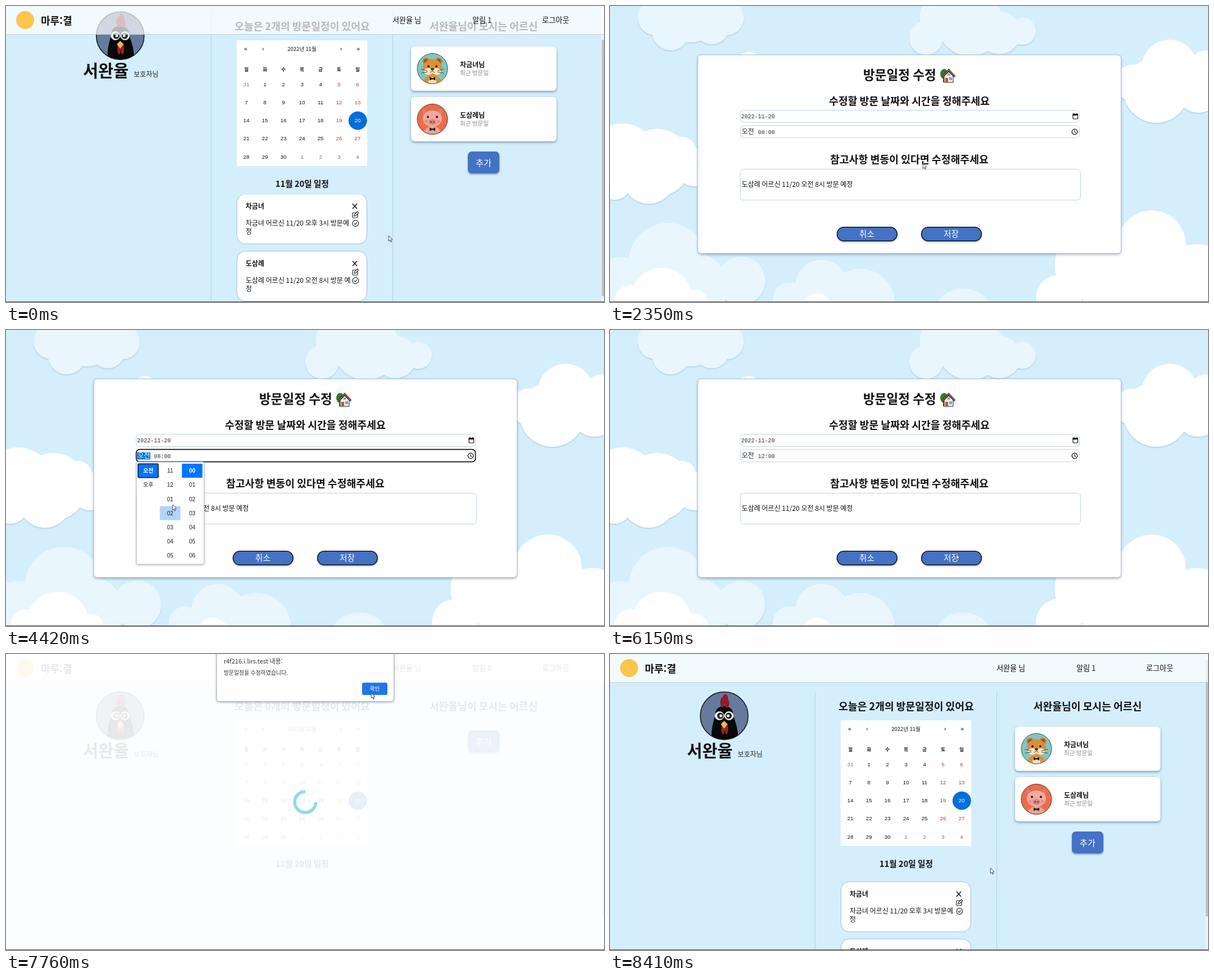
An HTML page with a canvas for the animation above (8480 ms loop, 1063 by 527 pixels).

```html
<!DOCTYPE html>
<html lang="ko">
<head>
<meta charset="utf-8">
<style>
  html, body { margin: 0; width: 100%; height: 100%; overflow: hidden; background: #d4eefc; }
  canvas { display: block; }
</style>
</head>
<body>
<canvas id="stage" width="1063" height="527"></canvas>
<script>
const ctx = document.getElementById('stage').getContext('2d');
const W = 1063, H = 527, LOOP = 8480;
const KR = '"Noto Sans CJK KR", "Noto Sans CJK", sans-serif';
const ARIAL = '"Liberation Sans", "Noto Sans CJK KR", sans-serif';
const MONO = '"Liberation Mono", monospace';
const SKY = '#d4eefc', BLUE = '#4472c4', PICK = '#0075ff';
const USER = '서완율', ELDER_A = '차금녀', ELDER_B = '도삼례';

// Key times of the story
const T = { edit: 1680, open: 3020, scroll: 4020, pick: 4890, close: 5400,
            alert: 6480, load: 7360, data: 7825, ready: 8060 };

// Pointer path: time, x, y
const PATH = [
  [0, 680, 409], [70, 680, 411], [335, 680, 411], [990, 616, 470], [1135, 616, 470],
  [1480, 617, 474], [1620, 617, 474], [2350, 556, 280], [2480, 802, 237], [2810, 825, 224],
  [2955, 825, 224], [3840, 294, 325], [4020, 294, 325], [4420, 296, 311], [4820, 293, 271],
  [4890, 293, 271], [5680, 673, 366], [5755, 673, 366], [6150, 615, 399], [6280, 615, 400],
  [6480, 615, 400], [7300, 660, 65], [7400, 660, 65], [7760, 649, 69], [7890, 640, 114],
  [8150, 620, 285], [8410, 676, 381], [8480, 676, 381]
];

function rate(i, a) {
  const p = PATH[i], q = PATH[i + 1];
  return p && q ? (q[a] - p[a]) / (q[0] - p[0]) : 0;
}
function slope(i, a) {
  const l = rate(i - 1, a), r = rate(i, a);
  return l * r > 0 ? 2 * l * r / (l + r) : 0;
}
function pointer(t) {
  let i = 0;
  while (i < PATH.length - 2 && t >= PATH[i + 1][0]) i++;
  const p = PATH[i], q = PATH[i + 1], d = q[0] - p[0], u = (t - p[0]) / d;
  return [1, 2].map(a => {
    const s = u * u * (3 - 2 * u);
    return p[a] + (q[a] - p[a]) * s + d * u * (1 - u) * ((1 - u) * slope(i, a) - u * slope(i + 1, a));
  });
}
const ease = u => { u = Math.min(1, Math.max(0, u)); return u * u * (3 - 2 * u); };

// Drawing helpers
function text(s, x, cy, size, o = {}) {
  ctx.font = `${o.w || 400} ${size}px ${o.font || KR}`;
  ctx.textAlign = o.align || 'left';
  ctx.fillStyle = o.c || '#111';
  ctx.fillText(s, x, cy + size * 0.37);
}
function finish(fill, stroke, lw = 1) {
  if (fill) { ctx.fillStyle = fill; ctx.fill(); }
  if (stroke) { ctx.shadowColor = 'transparent'; ctx.strokeStyle = stroke; ctx.lineWidth = lw; ctx.stroke(); }
}
function rect(x, y, w, h, fill) { ctx.fillStyle = fill; ctx.fillRect(x, y, w, h); }
function box(x, y, w, h, r, fill, stroke, lw) {
  ctx.beginPath(); ctx.roundRect(x, y, w, h, r); finish(fill, stroke, lw);
}
function oval(x, y, rx, ry, fill, stroke, lw) {
  ctx.beginPath(); ctx.ellipse(x, y, rx, ry, 0, 0, 7); finish(fill, stroke, lw);
}
const disc = (x, y, r, fill, stroke, lw) => oval(x, y, r, r, fill, stroke, lw);
function poly(pts, fill, stroke, lw, open) {
  ctx.beginPath();
  for (let i = 0; i < pts.length; i += 2) ctx.lineTo(pts[i], pts[i + 1]);
  if (!open) ctx.closePath();
  finish(fill, stroke, lw);
}
const line = (pts, c, lw = 1) => poly(pts, null, c, lw, true);
function shadow(dy, blur, alpha, draw) {
  ctx.save();
  ctx.shadowColor = `rgba(30,50,80,${alpha})`; ctx.shadowBlur = blur; ctx.shadowOffsetY = dy;
  draw();
  ctx.restore();
}
function at(x, y, draw) { ctx.save(); ctx.translate(x, y); draw(); ctx.restore(); }

// Portraits
function rooster() {
  disc(0, 0, 42.5, '#667a9d');
  ctx.save();
  ctx.beginPath(); ctx.arc(0, 0, 42, 0, 7); ctx.clip();
  ctx.beginPath(); ctx.moveTo(-22, 44);
  ctx.bezierCurveTo(-24, 20, -18, 10, -16, -4);
  ctx.bezierCurveTo(-14, -22, 14, -22, 16, -4);
  ctx.bezierCurveTo(18, 10, 26, 20, 24, 44); finish('#080808');
  oval(-3, -24, 4, 9, '#8f1d25'); oval(2, -30, 5, 9, '#8f1d25'); oval(5, -22, 4, 8, '#8f1d25');
  oval(-2, 23, 3, 10, '#9b2228'); oval(4, 23, 3, 10, '#9b2228');
  ctx.restore();
  oval(-8.5, 0, 8, 7.5, '#f4f4f4', '#d0d0d0', 1); oval(8.5, 0, 8, 7.5, '#f4f4f4', '#d0d0d0', 1);
  disc(-7, 0, 5.5, '#202020'); disc(8, 0, 5.5, '#202020');
  disc(-6, 0, 2.5, '#eee'); disc(7, 0, 2.5, '#eee');
  poly([0, 9, 6, 15, 0, 23, -6, 15], '#e7bb55');
  disc(0, 0, 42.5, null, '#111', 1.5);
}
function bow() { poly([-5, 15, 0, 17, 5, 15, 5, 21, 0, 19, -5, 21], '#222'); }
function hamster() {
  disc(0, 0, 27, '#83c5be');
  ctx.save(); ctx.beginPath(); ctx.arc(0, 0, 26.5, 0, 7); ctx.clip();
  oval(0, 24, 16, 12, '#dc8f39'); oval(0, 24, 7, 9, '#f6dfb9');
  ctx.restore();
  for (const s of [-1, 1]) { disc(s * 11, -13, 6.5, '#c97b2c'); disc(s * 11, -13, 3.8, '#85532b'); }
  oval(0, -2, 17, 15, '#dc8f39');
  for (const s of [-1, 1]) {
    oval(s * 7, 5, 8, 6, '#f7e5c6'); disc(s * 7, -4, 2, '#1b1b1b');
    line([s * 9, 4, s * 20, 1], '#222', 0.8); line([s * 9, 6, s * 20, 8], '#222', 0.8);
  }
  oval(0, 1, 3, 2, '#49301f'); line([-4, 7, 0, 4, 4, 7], '#49301f', 1);
  bow(); disc(0, 0, 27, null, '#31504f', 1);
}
function pig() {
  disc(0, 0, 27, '#e96d4a');
  ctx.save(); ctx.beginPath(); ctx.arc(0, 0, 26.5, 0, 7); ctx.clip();
  oval(0, 24, 15, 11, '#eda197');
  ctx.restore();
  for (const s of [-1, 1]) poly([s * 5, -12, s * 17, -18, s * 16, -5], '#d98279');
  oval(0, -1, 17, 14.5, '#f1a99f');
  for (const s of [-1, 1]) { disc(s * 8, -4, 2, '#241c1c'); disc(s * 11, 4, 3, '#e98d86'); }
  oval(0, 5, 7, 5, '#d9837c'); disc(-2.5, 5, 1.4, '#75383a'); disc(2.5, 5, 1.4, '#75383a');
  bow(); disc(0, 0, 27, null, '#5b3127', 1);
}

// Home page
function calendar() {
  rect(410, 118, 232, 224, '#fff');
  const mid = { align: 'center', font: ARIAL };
  [['«', 426], ['‹', 457], ['›', 595.5], ['»', 626]].forEach(([s, x]) => text(s, x, 133, 11, mid));
  text('2022년 11월', 526, 133.5, 9.6, { align: 'center' });
  const col = i => 427.3 + 32.95 * i;
  [...'월화수목금토일'].forEach((s, i) => text(s, col(i), 169.5, 8.3, { align: 'center', w: 700 }));
  for (let i = 0; i < 35; i++) {
    const c = i % 7, x = col(c), y = 196.5 + 32.1 * Math.floor(i / 7);
    const out = i < 1 || i > 30, today = i === 20;
    const n = i < 1 ? 31 : i > 30 ? i - 30 : i;
    if (i === 20) disc(625.3, 261.2, 16.4, '#006edc');
    const color = today ? '#fff' : out ? '#757575' : c > 4 ? '#bf3a28' : '#111';
    text(String(n), x, y, 9.8, { ...mid, c: color });
  }
}
function visit(y, name, a, b) {
  box(410.5, y + 0.5, 231, 89, 15, '#fff', '#a7bce2', 1);
  text(name, 426, y + 22.5, 12, { w: 700 });
  text(a, 426, y + 52.5, 12); text(b, 426, y + 67.5, 12);
  line([616, y + 18, 624, y + 27], '#111', 1.5); line([624, y + 18, 616, y + 27], '#111', 1.5);
  box(616, y + 34, 9, 9, 1.5, null, '#222', 1.2);
  poly([619, y + 40, 619.5, y + 37, 624.5, y + 32, 626.7, y + 34.2, 621.7, y + 39.2], '#fff', '#222', 1.1);
  disc(621.3, y + 53, 5.4, null, '#222', 1.2);
  line([618.7, y + 53, 620.7, y + 55, 624, y + 51.3], '#222', 1.2);
}
function elder(y, name, face) {
  shadow(2, 4, 0.45, () => box(720, y, 258.5, 79, 6, '#fff'));
  at(758, y + 39.5, face);
  text(name + '님', 807, y + 33, 12, { w: 700 });
  text('최근 방문일', 807, y + 47, 10.6, { c: '#8b8b8b' });
}
function header(alarms) {
  rect(0, 0, W, 50, 'rgba(255,255,255,0.7)');
  rect(0, 50, W, 1, '#b9d0de');
  disc(34, 25, 16, '#fcc54c');
  text('마루:결', 62, 26, 18, { w: 700 });
  const o = { w: 500 };
  text(USER + ' 님', 687, 25, 13.1, o);
  text('알림 ' + alarms, 829, 25, 13.1, o);
  text('로그아웃', 953, 25, 13.1, o);
}
function scrollbar(y, thumb) {
  rect(1058.5, 0, 5, H, '#f1f1f1');
  rect(1059, 11 + y * 0.867, 4, 456, thumb);
}
function home(y, inner, full, named) {
  rect(0, 0, W, H, SKY);
  ctx.save();
  ctx.translate(0, -y);
  rect(364, 67, 1, 520, '#b4d0e8'); rect(687, 67, 1, 520, '#b4d0e8');
  at(203, 110, rooster);
  text(USER, 137, 172.5, 29.3, { w: 700 });
  text('보호자님', 227, 179, 12, { c: '#222' });
  text(`오늘은 ${full ? 2 : 0}개의 방문일정이 있어요`, 526.5, 93, 18.2, { w: 700, align: 'center' });
  calendar();
  text('11월 20일 일정', 526.5, 374, 14.6, { w: 700, align: 'center' });
  text(USER + '님이 모시는 어르신', 849, 93, 18.2, { w: 700, align: 'center' });
  if (full) {
    ctx.save();
    ctx.beginPath(); ctx.rect(405, 393, 242, 200); ctx.clip();
    visit(405 - inner, ELDER_A, ELDER_A + ' 어르신 11/20 오후 3시 방문예', '정');
    visit(507 - inner, ELDER_B, ELDER_B + ' 어르신 11/20 오전 8시 방문 예', '정');
    ctx.restore();
    elder(129, named ? ELDER_A : '', hamster);
    elder(219, named ? ELDER_B : '', named ? pig : hamster);
  }
  const by = full ? 316 : 136;
  shadow(2, 3, 0.4, () => box(821, by, 56, 39, 7, BLUE));
  text('추가', 849, by + 20, 15.2, { c: '#fff', w: 500, align: 'center' });
  ctx.restore();
  scrollbar(y, '#c1c1c1');
  header(full ? 1 : 0);
}
function loading(t) {
  rect(0, 0, W, H, 'rgba(255,255,255,0.9)');
  if (t >= T.data) scrollbar(0, '#bcbcbc');
  const a = Math.max(0, t - 7765) * Math.PI * 2 / 1000;
  ctx.beginPath(); ctx.arc(532, 263.5, 18.7, a, a + Math.PI * 1.5);
  finish(null, '#8fdbe6', 5.6);
}

// Edit page
function cloud(fill, list) {
  shadow(2, 2, 0.13, () => {
    ctx.beginPath();
    for (const [x, y, r] of list) { ctx.moveTo(x + r, y); ctx.arc(x, y, r, 0, 7); }
    finish(fill);
  });
}
function sky() {
  rect(0, 0, W, H, SKY);
  const pale = '#e9f6fd', white = '#fff';
  cloud(pale, [[81, 20, 32], [108, 46, 33], [145, 20, 45], [181, 37, 31], [207, 21, 31]]);
  cloud(pale, [[562, 57, 30], [590, 20, 40], [640, 30, 59], [692, 48, 38], [733, 45, 24]]);
  cloud(pale, [[103, 456, 70], [233, 489, 43], [20, 505, 58], [150, 500, 60]]);
  cloud(pale, [[376, 499, 47], [445, 530, 62], [319, 522, 30], [628, 560, 57]]);
  cloud(white, [[22, 271, 62], [84, 279, 60], [128, 258, 25], [69, 305, 47], [8, 315, 30], [150, 287, 34]]);
  cloud(white, [[92, 521, 55], [37, 527, 30], [150, 530, 25]]);
  cloud(white, [[368, 540, 28]]);
  cloud(white, [[247, 106, 24]]);
  cloud(white, [[995, 110, 50], [930, 137, 33], [971, 150, 58], [1046, 148, 42], [1058, 106, 27]]);
  cloud(white, [[963, 425, 61], [850, 462, 60], [798, 520, 41], [1043, 483, 59], [930, 520, 90]]);
}
function house() {
  oval(-6, -3, 7, 9, '#2f7d32'); rect(-8, 4, 3, 8, '#754727');
  poly([-6, 1, 2, -7, 10, 1, 10, 12, -6, 12], '#f5efe3', '#222', 1);
  line([-9, 2, 2, -10, 13, 2], '#2a211c', 3.4); line([-9, 2, 2, -10, 13, 2], '#b86d43', 1.6);
  rect(-4, 4, 5, 8, '#c94f38'); rect(3, 3, 5, 5, '#4fb4e6'); rect(0, -4, 4, 4, '#4fb4e6');
}
function button(x, label) {
  shadow(2, 3, 0.45, () => box(x + 0.7, 393.7, 106.6, 24.6, 12, BLUE, '#10151f', 1.5));
  text(label, x + 53.5, 406, 14.7, { c: '#fff', align: 'center' });
}
function picker(t) {
  shadow(1, 4, 0.4, () => box(232, 235, 120, 182, 1, '#fff', '#bbb', 1));
  const row = 25.2, cy = i => 250.5 + row * i;
  const cell = (x, i, fill) => box(x, cy(i) - 12.6, 36.5, 25, 1, fill);
  const put = (s, x, i, on, font) =>
    text(s, x, cy(i), 10, { align: 'center', font, w: on ? 700 : 400, c: on ? '#fff' : '#222' });
  ctx.save();
  ctx.beginPath(); ctx.rect(232, 236, 120, 180); ctx.clip();
  cell(234.5, 0, PICK);
  box(234.7, 238.2, 36, 24.6, 2, null, '#111', 1.5);
  put('오전', 253, 0, true); put('오후', 253, 1);
  const picked = t >= T.pick ? 4 : 0;
  const off = 3 * ease((t - T.scroll) / 270) + ease((t - T.pick) / 150);
  const [hx, hy] = pointer(t - 100);
  const over = hx > 273 && hx < 311 && hy > 238 && hy < 414 ? Math.floor((hy - 238) / row + off) : -1;
  for (let i = Math.floor(off); i < off + 7; i++) {
    if (i === picked) cell(273.5, i - off, PICK);
    else if (i === over) cell(273.5, i - off, '#b1d4fc');
    put(String((7 + i) % 12 + 1).padStart(2, '0'), 291.8, i - off, i === picked, ARIAL);
  }
  cell(312.7, 0, PICK);
  for (let i = 0; i < 7; i++) put('0' + i, 331, i, !i, ARIAL);
  ctx.restore();
}
function edit(t) {
  sky();
  shadow(2, 4, 0.4, () => box(156, 87, 752.5, 353.5, 6, '#fff', '#a5bfe0', 1));
  text('방문일정 수정', 450, 122.5, 22.6, { w: 700 });
  at(600, 124, house);
  const head = { w: 700, align: 'center' };
  text('수정할 방문 날짜와 시간을 정해주세요', 532, 169, 18.3, head);
  text('참고사항 변동이 있다면 수정해주세요', 532, 273.5, 18.3, head);
  const open = t >= T.open && t < T.close, edge = '#c0d2ea';
  box(231.5, 185.5, 603, 22, 6, '#fff', edge, 1);
  box(231.5, 212.7, 603, 22, 6, '#fff', open ? '#111' : edge, open ? 1.7 : 1);
  box(231.5, 290.5, 605, 55, 6, '#fff', edge, 1);
  const mono = { font: MONO, c: '#333' };
  text('2022-11-20', 233, 196, 10, mono);
  if (open) rect(233, 217.5, 23.5, 13, '#0078d7');
  text('오전', 234, 224, 12, { w: 300, c: open ? '#fff' : '#222' });
  text(t >= T.pick ? '12:00' : '08:00', 263, 224, 10, mono);
  box(823, 192.5, 8.5, 8.5, 1, null, '#111', 1.2); rect(822.5, 192, 9.5, 3, '#111');
  rect(824, 190.5, 1.3, 2, '#111'); rect(829.2, 190.5, 1.3, 2, '#111');
  disc(826, 224, 4.8, null, '#111', 1.3); line([826, 221, 826, 224.3, 828.3, 225.7], '#111', 1.1);
  text(ELDER_B + ' 어르신 11/20 오전 8시 방문 예정', 234, 317.8, 12);
  button(403, '취소'); button(553, '저장');
  if (open) picker(t);
}

function notice() {
  shadow(1, 4, 0.5, () => box(374.5, -8, 315, 92.5, 5, '#fff', '#b5b9bd', 1));
  text('r4f216.i.lirs.test 내용:', 387, 12.5, 11, { c: '#333' });
  text('방문일정을 수정하였습니다.', 387, 33, 9.9, { c: '#333' });
  box(633, 51, 45, 22, 3, '#2078e8');
  text('확인', 655.5, 62, 9.3, { c: '#fff', align: 'center' });
}
function arrow([x, y]) {
  at(x, y, () => poly([0.3, 0, 0.3, 9.7, 2.5, 7.8, 4, 11.2, 5.6, 10.5, 4.1, 7.2, 7, 7], '#fff', '#333', 0.9));
}

function draw(t) {
  ctx.clearRect(0, 0, W, H);
  if (t < T.edit) home(57, 14, true, true);
  else if (t < T.load) edit(t);
  else if (t < T.ready) { home(0, 0, t >= T.data, false); loading(t); }
  else home(0, 0, true, true);
  if (t >= T.alert && t < T.data) notice();
  rect(0, 526, W, 1, '#4a4f53');
  arrow(pointer(t));
}
const start = performance.now();
function tick() {
  draw((performance.now() - start) % LOOP);
  requestAnimationFrame(tick);
}
tick();
</script>
</body>
</html>
```
